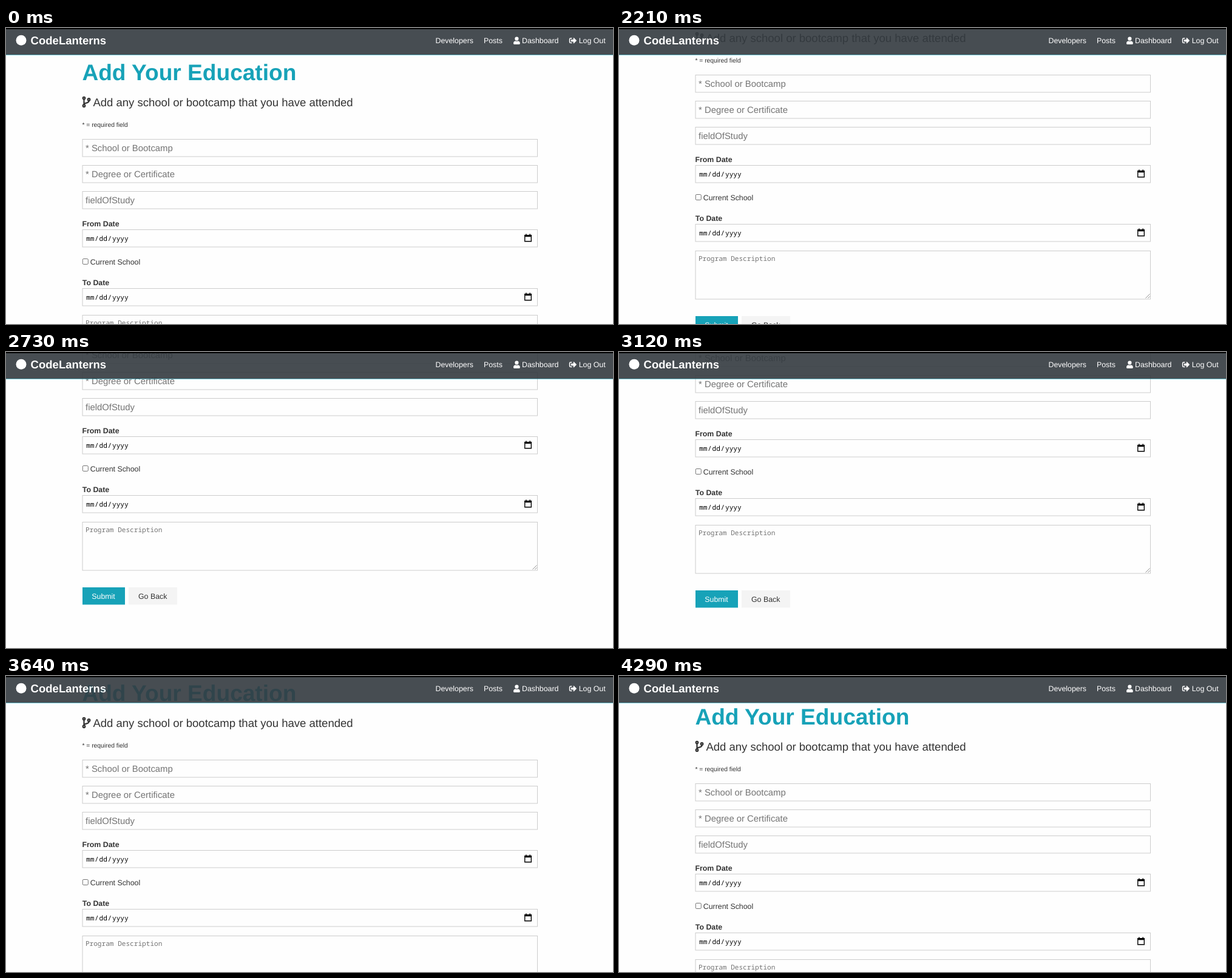
These frames come from a looping animation (1000 by 488 pixels, 6500 ms). An HTML page:

```html
<!DOCTYPE html>
<html lang="en">
<head>
<meta charset="utf-8">
<title>Add Your Education</title>
<style>
  html, body { margin: 0; width: 100%; height: 100%; overflow: hidden; background: #fefefe; }
  svg { display: block; width: 100%; height: 100%; }
  text { font: 12.36px "Liberation Sans", Arial, sans-serif; fill: #333; text-rendering: geometricPrecision; white-space: pre; }
  .title { font-size: 37.1px; font-weight: bold; fill: #17a2b8; }
  .lead { font-size: 18.53px; }
  .small { font-size: 10.3px; }
  .label { font-weight: bold; }
  .hint { font-size: 14.86px; fill: #757575; }
  .mono { font: 11.1px "Noto Sans Mono", "DejaVu Sans Mono", monospace; fill: #757575; }
  .date { fill: #000; }
  .box { fill: #fefefe; stroke: #ccc; }
  .check { fill: #fefefe; stroke: #767676; }
  .grip { fill: none; stroke: #777; stroke-width: .8; }
  .nav { opacity: .9; }
  .nav text, .nav .icon { fill: #fff; }
  .nav .brand { font-size: 18.53px; font-weight: bold; }
  .branch { fill: none; stroke: #333; stroke-width: 62; }
</style>
</head>
<body>
<svg viewBox="0 0 1000 488">
  <defs>
    <g id="calendar">
      <path d="M854.7 341.7h10.6v10.1h-10.6z" fill="none" stroke="#000" stroke-width="1.4"/>
      <path d="M854 341h12v3.2h-12zM856 339.5h1.6v2H856zM862.4 339.5h1.6v2h-1.6z"/>
    </g>
    <g id="date">
      <rect class="box" x="126" y="332.5" width="749.5" height="28.5"/>
      <text class="mono date" y="351"><tspan x="132">mm</tspan><tspan x="146.1">/</tspan><tspan x="153.5">dd</tspan><tspan x="167.6">/</tspan><tspan x="175">yyyy</tspan></text>
      <use href="#calendar"/>
    </g>
  </defs>

  <g id="page">
    <text class="title" x="125.4" y="86">Add Your Education</text>
    <g class="branch" transform="translate(125.6 112.7) scale(.036)">
      <circle cx="80" cy="80" r="49"/>
      <circle cx="80" cy="432" r="49"/>
      <circle cx="304" cy="144" r="49"/>
      <path d="M80 140V372M304 204C304 340 110 270 86 360"/>
    </g>
    <text class="lead" x="143.4" y="128.8">Add any school or bootcamp that you have attended</text>
    <text class="small" x="125.4" y="163.4">* = required field</text>

    <g id="fields"></g>

    <text class="label" x="125.4" y="327">From Date</text>
    <use href="#date"/>
    <rect class="check" x="126.3" y="380.5" width="9" height="9" rx="1.6"/>
    <text x="138.8" y="390">Current School</text>
    <text class="label" x="125.8" y="424.2">To Date</text>
    <use href="#date" y="97"/>

    <rect class="box" x="126" y="473.5" width="749.5" height="79.5"/>
    <text class="mono" x="130.9" y="489.5">Program Description</text>
    <path class="grip" d="M867.5 551.5l7-7M871.5 551.5l3-3"/>

    <rect x="126" y="581" width="70" height="28.5" fill="#17a2b8"/>
    <text x="141.3" y="599.5" style="fill:#fff">Submit</text>
    <rect x="202" y="581" width="80" height="28.5" fill="#f4f4f4"/>
    <text x="218" y="599.5">Go Back</text>
  </g>

  <g class="nav">
    <rect width="1000" height="44" fill="#343a40"/>
    <rect y="44" width="1000" height=".7" fill="#17a2b8"/>
    <circle class="icon" cx="25" cy="20.3" r="8.5"/>
    <text class="brand" x="40.6" y="27">CodeLanterns</text>
    <text x="707.5" y="25.3">Developers</text>
    <text x="787" y="25.3">Posts</text>
    <g class="icon" transform="translate(836 14.6) scale(.024)">
      <circle cx="224" cy="128" r="128"/>
      <path d="M134 288Q224 320 314 288C388 288 448 348 448 422V464Q448 512 400 512H48Q0 512 0 464V422C0 348 60 288 134 288z"/>
    </g>
    <text x="850" y="25.3">Dashboard</text>
    <g class="icon" transform="translate(927.8 14.6) scale(.024)">
      <path d="M497 273L329 441Q300 465 288 424V328H152Q128 328 128 304V208Q128 184 152 184H288V88Q300 47 329 71L497 239Q512 256 497 273z"/>
      <path d="M192 64V128H96Q64 128 64 160V352Q64 384 96 384H192V448H96Q0 448 0 352V160Q0 64 96 64z"/>
    </g>
    <text x="943.7" y="25.3">Log Out</text>
  </g>
  <rect width="1000" height="2" fill="#000"/>
</svg>

<script>
  const LOOP = 6500;

  const hints = ['* School or Bootcamp', '* Degree or Certificate', 'fieldOfStudy'];
  document.getElementById('fields').innerHTML = hints.map((hint, i) => {
    const top = 183.5 + 43 * i;
    return `<rect class="box" x="126" y="${top}" width="749.5" height="28.5"/>
      <text class="hint" x="131" y="${top + 19.3}">${hint}</text>`;
  }).join('');

  // [time in ms, scroll offset in px]
  const scroll = [
    [0, 0], [1820, 38], [1950, 60],
    [2210, 106], [2340, 153], [2470, 180], [2600, 189], [2730, 193],
    [3120, 188], [3250, 156], [3380, 111], [3510, 71], [3640, 45], [3770, 29],
    [3900, 18], [4030, 12], [4160, 8], [4290, 6], [LOOP, 6]
  ];
  document.getElementById('page').animate(
    scroll.map(([time, y]) => ({
      offset: time / LOOP,
      transform: `translateY(${-y}px)`,
      easing: 'steps(1, end)'
    })),
    { duration: LOOP, iterations: Infinity }
  );
</script>
</body>
</html>
```
